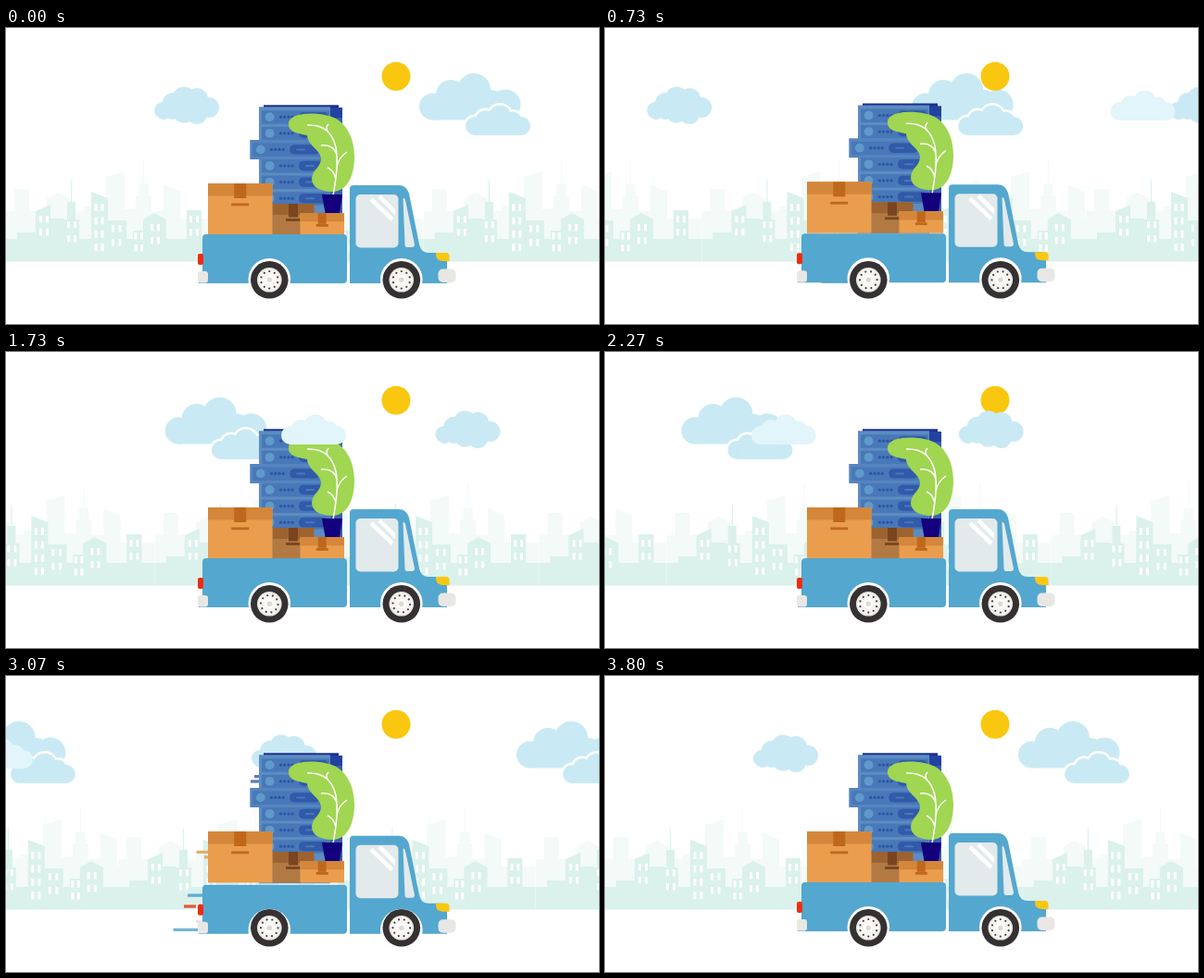
An HTML page with a canvas that plays this animation: 640 by 320 pixels, repeating every 3830 ms.

```html
<!DOCTYPE html>
<html lang="en">
<head>
<meta charset="utf-8">
<title>Moving truck</title>
<style>
html, body { margin: 0; width: 100%; height: 100%; overflow: hidden; background: #fff; }
canvas { display: block; width: 640px; height: 320px; }
</style>
</head>
<body>
<canvas id="stage" width="640" height="320"></canvas>
<script>
const ctx = document.getElementById('stage').getContext('2d');
const LOOP = 3830, STEP = 40, LAST = 95, W = 640;
const BLUE = '#54a7cf', SKY = '#c9eaf4', YELLOW = '#fac710', GLASS = '#e2eaeb';

function rect(x, y, w, h, color, r = 0) {
  ctx.fillStyle = color;
  ctx.beginPath();
  ctx.roundRect(x, y, w, h, r);
  ctx.fill();
}

function disc(x, y, r, color) {
  ctx.fillStyle = color;
  ctx.beginPath();
  ctx.arc(x, y, r, 0, Math.PI * 2);
  ctx.fill();
}

function shape(d, color) {
  ctx.fillStyle = color;
  ctx.fill(new Path2D(d));
}

function line(d, color, width) {
  ctx.strokeStyle = color;
  ctx.lineWidth = width;
  ctx.stroke(new Path2D(d));
}

function shifted(dx, dy, draw) {
  ctx.save();
  ctx.translate(dx, dy);
  draw();
  ctx.restore();
}

// Smooth interpolation through [position, value] keys.
function keyed(keys, p) {
  if (p <= keys[0][0]) return keys[0][1];
  for (let i = 1; i < keys.length; i++) {
    const [a, u] = keys[i - 1], [b, v] = keys[i];
    if (p <= b) {
      const k = (p - a) / (b - a);
      return u + (v - u) * k * k * (3 - 2 * k);
    }
  }
  return keys[keys.length - 1][1];
}

// ---- City ----
function farTile() {
  shape('M0 252.5V198H9V174H25V198H44V184L56 178L68 184V198H84V193H97V199H108V161' +
    'L128 155V196H140V182H143.500V169H153.500V182H157V198H170V169L188 177V206H225V252.5Z', '#f3faf8');
  rect(148, 141, 1, 30, '#f3faf8');
}

function windows(x, y, dx, dy, rows, h) {
  for (let i = 0; i < rows; i++) {
    rect(x, y + i * dy, 3, h, '#fff');
    rect(x + dx, y + i * dy, 3, h, '#fff');
  }
}

function nearTile() {
  const c = '#dbf1ec';
  shape('M0 252.5V228H12V221H32V198L48 191V206H63V207H66V188H75V207H79V228H92V177L110 184' +
    'V208H130V228H137V219H148V207L160 200L173 207V228H195V197H211V228H225V252.5Z', c);
  rect(70, 165, 1.2, 25, c);
  windows(36, 203, 7, 14, 2, 7.5);
  windows(66, 209, 7, 15, 2, 7.5);
  windows(95.5, 190, 7, 14.4, 4, 8);
  windows(114, 213, 7.5, 15, 2, 7.5);
  windows(138.5, 221, 6.5, 13, 2, 7.5);
  windows(156, 212, 7, 14, 2, 7.5);
  windows(198, 203, 7, 14, 2, 7.5);
}

function panorama() {
  ctx.beginPath();
  ctx.rect(0, 130, W, 125);
  ctx.clip();
  for (const tile of [farTile, nearTile])
    for (let i = 0; i < 3; i++) shifted(i * 225.4, 0, tile);
}

function city(n) {
  const x = Math.round(n * W / LAST);
  shifted(-x, 0, panorama);
  shifted(W - x, 0, panorama);
}

// ---- Clouds ----
const PUFFS = {
  small: [[9, 89, 9], [20, 81, 11], [32, 76, 12.5], [46, 77, 12], [59, 86, 11],
          [46, 93, 11], [32, 91, 11.5], [10, 92, 7], [20, 90, 9]],
  big: [[14.5, 85, 14.5], [34, 72, 16], [59, 67, 18], [78, 80, 13], [93, 83, 16.5]],
  low: [[10, 90, 10], [21, 83, 10], [37, 80, 12.5], [51, 84, 9.5], [60, 90, 10]]
};

function puffs(list, color, grow = 0) {
  for (const [x, y, r] of list) disc(x, y, r + grow, color);
}

function lowCloud(color, grow = 0) {
  puffs(PUFFS.low, color, grow);
  rect(10, 84 - grow, 50, 16 + 2 * grow, color);
}

function bigCloud() {
  puffs(PUFFS.big, SKY);
  rect(14, 76, 80, 23.5, SKY);
  shifted(50, 16, () => {
    lowCloud('#fff', 2.4);
    lowCloud(SKY);
  });
}

function smallCloud() {
  puffs(PUFFS.small, SKY);
  rect(20, 78, 34, 16, SKY);
}

// One copy leaves while a slower one arrives at the same starting place.
function passing(n, x, draw) {
  shifted(x - n * 6.378, 0, draw);
  shifted(x + (LAST - n) * 5.833, 0, draw);
}

// ---- Cargo ----
function tower() {
  rect(278, 83.3, 81, 8, '#1b2f8e');
  rect(349, 87, 14, 113, '#3a5fae');
  rect(349, 86, 14, 11, '#2342a0');
  rect(273, 85.3, 77, 139, '#5d8cc3');
  for (let i = 0; i < 6; i++) {
    const y = 96.2 + i * 17.6, dx = i === 2 ? -9.8 : 0;
    if (dx) rect(263.3, 121, 78, 21, '#5584bf');
    rect(276 + dx, y - 7, 73, 14.5, '#4878b8');
    disc(284.6 + dx, y, 4.9, '#5f9acb');
    for (let k = 0; k < 4; k++) disc(296.5 + k * 4.2 + dx, y, 1.6, '#2d54a4');
    rect(316 + dx, y - 5.2, 32, 10.4, '#315aa9', 5);
    rect(323 + dx, y - 1, 10, 2, '#4878b8', 1);
  }
}

function carton(x, y, w, h, lid, tape, label, colors) {
  rect(x, y, w, h, colors[0]);
  rect(x, y, w, lid, colors[1]);
  const mid = x + w / 2;
  rect(mid - tape / 2, y, tape, lid + 2.5, colors[2]);
  rect(mid - label / 2, y + lid + (h - lid) * 0.19, label, 2.8, colors[2]);
}

const TAN = ['#eb9d4e', '#d4873a', '#bf681b'];
const BROWN = ['#b27a42', '#9c6330', '#7b4420'];

function plant() {
  shape('M305 103C306 92 330 91 344 94C366 97 376 118 376 139C376 160 368 177 352 177' +
    'C340 177 330 172 330 163C331 152 340 151 340 141C339 131 326 128 325 116' +
    'C316 114 304 113 305 103Z', '#a0d651');
  line('M325 105C341 104 352 112 356 129C359 146 356 164 353 181' +
    'M347.500 112.500C345 109 346 106 348 104M340 127C348 126 354 128 357 137' +
    'M368 134C362 138 358 143 357 151M347 151C352 153 355 158 356 164', '#fff', 1.5);
  shape('M341 180H363L360 200H344.500Z', '#14007c');
}

function cargo(lift, toss) {
  const at = (amp, draw) => shifted(0, lift - amp * toss, draw);
  at(4, tower);
  at(5, () => carton(287.5, 190, 45, 33.5, 12, 10, 16, BROWN));
  at(12, plant);
  at(6, () => carton(317.5, 200, 47.5, 23.5, 9.3, 9, 13, TAN));
  at(3, () => carton(218, 168, 69.5, 55.5, 13.5, 13, 19, TAN));
}

// ---- Truck ----
function body() {
  shape('M208 276V273H212V227Q212 223 216 223H364Q368 223 368 227V272Q368 276 364 276Z', BLUE);
  shape('M371 276V174Q371 170 375 170H424Q432 170 435 179L446 234Q448 243 456 243H471' +
    'Q476 243 476 249V276Z', BLUE);
  rect(377.5, 180, 46, 57.5, GLASS, 5);
  ctx.save();
  ctx.beginPath();
  ctx.roundRect(377.5, 180, 42.5, 57.5, 5);
  ctx.clip();
  line('M394 185L417 207M403 182L422 201', '#fff', 4.5);
  ctx.restore();
  shape('M428.500 185Q429 182 431 186L441 234Q441 237 438 237H433Q430.500 237 430.500 234Z', GLASS);
  shape('M464 243H475Q478.500 243 478.500 247V252H472Q464 252 464 245Z', YELLOW);
  rect(466.5, 260.5, 19, 14.5, '#e9e7e3', 5);
  rect(207, 244, 6, 12, '#ee2c0c', 2);
  rect(207, 263, 11, 12.5, '#e9e7e3', 3);
  for (const x of [284.3, 426.8]) disc(x, 271.8, 22.8, '#fff');
}

function wheel(x, angle) {
  const y = 272.3;
  disc(x, y, 20.3, '#353132');
  disc(x, y, 13.3, '#e9e7e0');
  disc(x, y, 11.5, '#f7f6f2');
  for (let i = 0; i < 10; i++) {
    const a = angle + i * Math.PI / 5 - Math.PI / 2;
    disc(x + 9.3 * Math.cos(a), y + 9.3 * Math.sin(a), 1.1, '#454142');
  }
  disc(x, y, 5, '#fff');
  disc(x, y, 2.8, '#dedbd3');
}

const STREAKS = [
  [224, 107, 23, '#4a6fb7'], [220, 112.3, 13, '#4a6fb7'],
  [161.5, 188.7, 38.5, '#e0a560'], [170, 194.2, 23, '#e0a560'],
  [152, 235.5, 24, BLUE],
  [148, 247.4, 13, '#ee4326'], [166, 247.4, 23, '#ee4326'],
  [161, 264, 24, '#e4e2de'], [136.5, 272.7, 42.5, '#65afd0']
];

function streaks(p) {
  if (p < 18 || p > 40) return;
  ctx.save();
  ctx.globalAlpha = Math.min(0.9, Math.max(0, 1 - (p - 24) / 16));
  for (const [x, y, w, color] of STREAKS) rect(x + 8.8 * (29 - p), y, w, 3.3, color);
  ctx.restore();
}

// ---- Jolt, played twice per loop ----
const SAG = [[14, 0], [18, -0.7], [20, -0.4], [24, 2.7], [29, 1], [34, 0]];
const LIFT = [[14, 0], [18, -1.7], [23, 0]];
const TOSS = [[24, 0], [28, 1], [29, 1], [36, 0]];

function render(n) {
  ctx.fillStyle = '#fff';
  ctx.fillRect(0, 0, W, 320);
  const p = n < 53 ? n : n - 53;

  city(n);
  passing(n, 446, bigCloud);
  disc(421, 52.2, 15.5, YELLOW);
  passing(n, 160, smallCloud);

  streaks(p);
  cargo(keyed(LIFT, p), keyed(TOSS, p));
  shifted(0, keyed(SAG, p), body);
  const angle = n / LAST * 10 * Math.PI;
  wheel(284.3, angle);
  wheel(426.8, angle);

  shifted(724.4 - n * 9.94, 0, () => lowCloud('#e1f5fb'));
}

const start = performance.now();

function tick() {
  const t = (performance.now() - start) % LOOP;
  render(Math.min(LAST, Math.floor((t + 10) / STEP)));
  requestAnimationFrame(tick);
}
tick();
</script>
</body>
</html>
```
